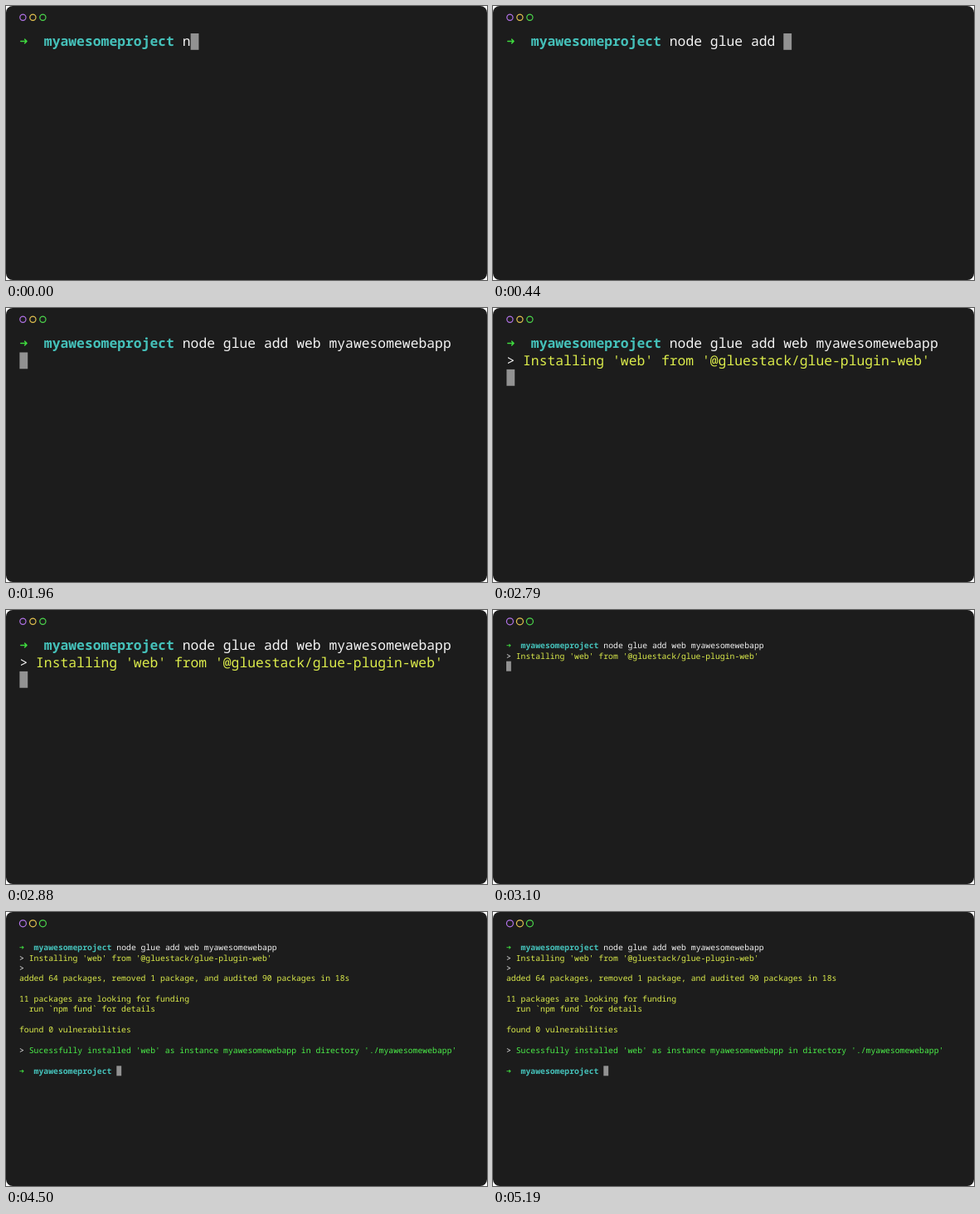
Animation, 580 px wide and 330 px high, one loop 5.26 s. Source, as an HTML page:

```html
<!DOCTYPE html>
<html lang="en">
<head>
<meta charset="utf-8">
<title>Terminal</title>
<style>
  html, body { margin: 0; width: 100%; height: 100%; overflow: hidden; background: #fff; }
  svg { display: block; }
  text {
    font-family: "Noto Sans Mono", "DejaVu Sans Mono", monospace;
    white-space: pre;
    text-rendering: geometricPrecision;
  }
  .arrow { font-family: "DejaVu Sans Mono", "DejaVu Sans", monospace; }
</style>
</head>
<body>
<svg width="580" height="330" viewBox="0 0 580 330">
  <rect width="580" height="330" rx="8" fill="#1c1c1c"/>
  <g id="rings" fill="none" stroke-width="1.2">
    <circle cx="20.4" cy="13.8" stroke="#b374ea"/>
    <circle cx="32.4" cy="13.8" stroke="#e6c550"/>
    <circle cx="44.4" cy="13.8" stroke="#4cd94c"/>
  </g>
  <g id="screen"></g>
</svg>
<script>
const LOOP = 5260, ZOOM_OUT = 2960;
const WHITE = '#f4f4f4', TEAL = '#45c1ba', LIME = '#dcec4b', GREEN = '#4bee49', ARROW = '#3fdc3f';
const COMMAND = 'node glue add web myawesomewebapp';

const LARGE = { x: 16.4, y: 33, cell: 9.82, line: 20.45, ring: 3.6 };
const SMALL = { x: 16, y: 37, cell: 5.865, line: 12.36, ring: 4 };

// Typing rhythm: [time, characters typed]
const TYPING = [[0, 1], [420, 14], [600, 14], [1070, 20], [1380, 22], [1575, 28], [1720, 33]];

const prompt = (at, row) => [
  { at, row, col: 0, color: ARROW, text: '➜', bold: true, cls: 'arrow' },
  { at, row, col: 3, color: TEAL, text: 'myawesomeproject', bold: true }
];
const say = (at, row, color, text, col = 0) => ({ at, row, col, color, text });

const OUTPUT = [
  ...prompt(0, 0),
  say(2080, 1, WHITE, '>'),
  say(2080, 1, LIME, "Installing 'web' from '@gluestack/glue-plugin-web'", 2),
  say(3200, 2, WHITE, '>'),
  say(3200, 3, LIME, 'added 64 packages, removed 1 package, and audited 90 packages in 18s'),
  say(3200, 5, LIME, '11 packages are looking for funding'),
  say(3200, 6, LIME, 'run `npm fund` for details', 2),
  say(3200, 8, LIME, 'found 0 vulnerabilities'),
  say(3420, 10, WHITE, '>'),
  say(3420, 10, GREEN, "Sucessfully installed 'web' as instance myawesomewebapp in directory './myawesomewebapp'", 2),
  ...prompt(3600, 12)
];

// Cursor jumps after the command is entered: [time, row, column]
const CURSOR = [[1790, 1, 0], [2080, 2, 0], [3200, 10, 0], [3420, 12, 0], [3600, 12, 20]];

const screen = document.getElementById('screen');
const rings = document.querySelectorAll('#rings circle');

function typedCount(t) {
  const i = TYPING.findIndex(([at]) => at > t);
  if (i < 0) return COMMAND.length;
  const [t0, n0] = TYPING[i - 1], [t1, n1] = TYPING[i];
  return Math.floor(n0 + (n1 - n0) * (t - t0) / (t1 - t0));
}

function draw(t) {
  const view = t < ZOOM_OUT ? LARGE : SMALL;
  const { x, y, cell, line } = view;
  const typed = typedCount(t);
  const [, row, col] = CURSOR.findLast(([at]) => at <= t) || [0, 0, 20 + typed];
  const shown = OUTPUT.filter(s => s.at <= t);
  shown.push(say(0, 0, WHITE, COMMAND.slice(0, typed), 20));

  screen.innerHTML =
    `<rect x="${x + col * cell}" y="${y + row * line}" width="${cell}" height="${line * 0.97}" fill="#929292"/>` +
    shown.map(s =>
      `<text class="${s.cls || ''}" x="${x + s.col * cell}" y="${y + (s.row + 0.755) * line}"
        font-size="${cell / 0.6}" font-weight="${s.bold ? 700 : 400}" fill="${s.color}">${s.text}</text>`
    ).join('');
  rings.forEach(c => c.setAttribute('r', view.ring));
}

const start = performance.now();
function tick() {
  draw((performance.now() - start) % LOOP);
  requestAnimationFrame(tick);
}
tick();
</script>
</body>
</html>
```
